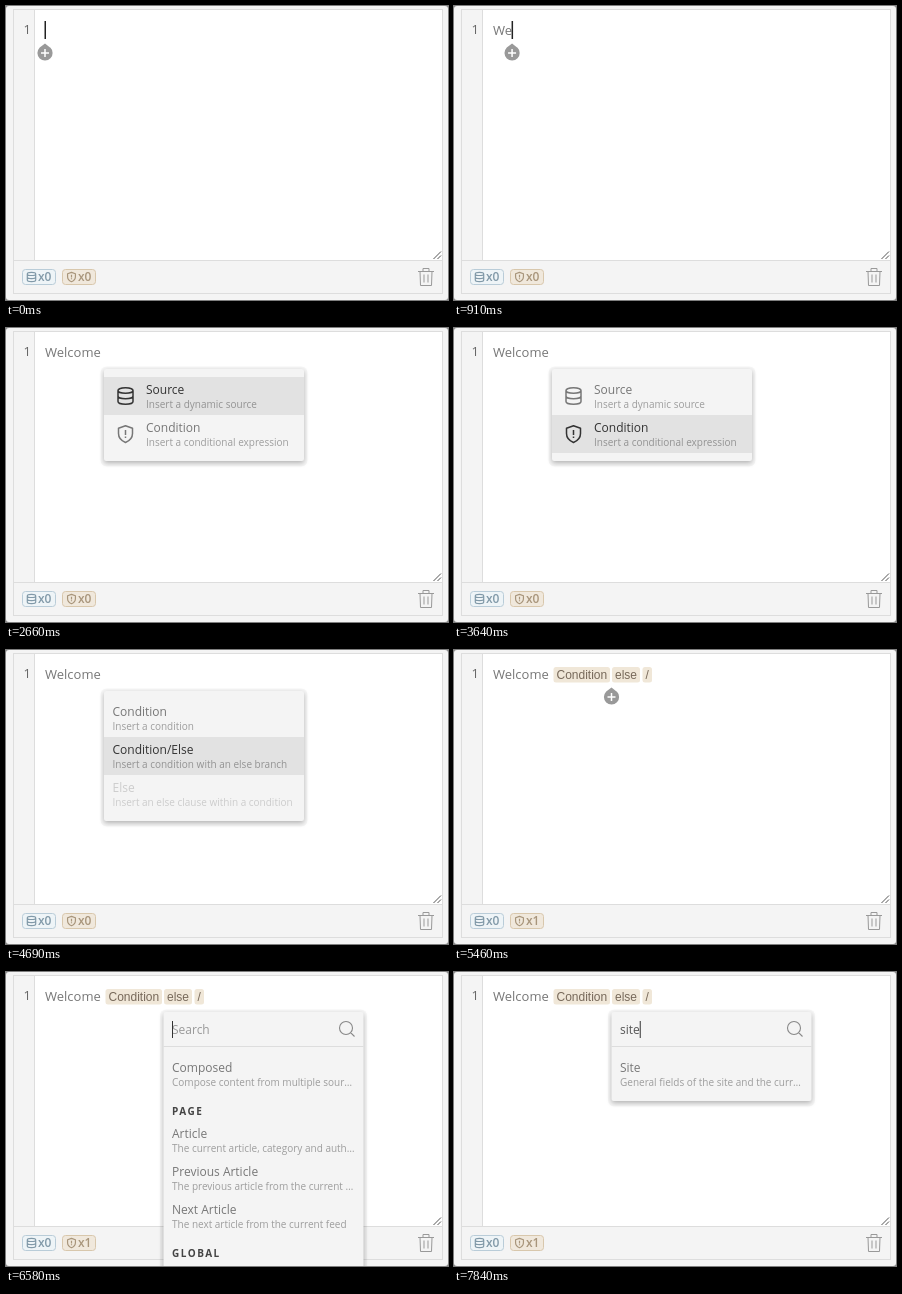
Write an HTML page with a canvas that moves like this. It is 442x294 px and loops after 8 s.

```html
<!DOCTYPE html>
<html lang="en">
<head>
<meta charset="utf-8">
<title>Editor with slash menu</title>
<style>
  html, body { margin: 0; width: 100%; height: 100%; overflow: hidden; background: #888; }
  canvas { display: block; width: 442px; height: 294px; }
</style>
</head>
<body>
<canvas id="stage"></canvas>
<script>
const W = 442, H = 294, LOOP = 8000;
const canvas = document.getElementById('stage');
const ctx = canvas.getContext('2d');
const dpr = window.devicePixelRatio || 1;
canvas.width = W * dpr;
canvas.height = H * dpr;

const SANS = '"Open Sans", sans-serif';
const GREY = '#777', DARK = '#333', PALE = '#ccc', PANEL = '#f4f4f4';
const typeTimes = [560, 910, 1190, 1330, 1470, 1610, 1820, 2030];
const searchTimes = [7350, 7490, 7630, 7840];
const caretOn = [[0, 210], [560, 2590], [3080, 3640], [4130, 4690], [4970, 5460], [6020, 6510]];

const typed = (word, times, t) => word.slice(0, times.filter(at => at <= t).length);
const ramp = (t, from, to) => Math.min(1, Math.max(0, (t - from) / (to - from)));
const grey = v => `rgb(${v},${v},${v})`;

function text(str, x, y, size, color, weight = 400, family = SANS) {
  ctx.font = `${weight} ${size}px ${family}`;
  ctx.fillStyle = color;
  ctx.fillText(str, x, y);
}

function width(str, size) {
  ctx.font = `400 ${size}px ${SANS}`;
  return ctx.measureText(str).width;
}

function rect(x, y, w, h, color) {
  ctx.fillStyle = color;
  ctx.fillRect(x, y, w, h);
}

function roundRect(x, y, w, h, r, fill, stroke) {
  ctx.beginPath();
  ctx.roundRect(x, y, w, h, r);
  ctx.fillStyle = fill;
  ctx.fill();
  if (stroke) {
    ctx.strokeStyle = stroke;
    ctx.lineWidth = 1;
    ctx.stroke();
  }
}

// Strokes an SVG path around (x, y).
function icon(path, x, y, color, line, scale = 1) {
  ctx.save();
  ctx.translate(x, y);
  ctx.scale(scale, scale);
  ctx.strokeStyle = color;
  ctx.lineWidth = line / scale;
  ctx.lineJoin = 'round';
  ctx.stroke(new Path2D(path));
  ctx.restore();
}

const DATABASE = 'M-7.5-5.5a7.5 2.8 0 0 1 15 0a7.5 2.8 0 0 1-15 0V5.5a7.5 2.8 0 0 0 15 0V-5.5M-7.5 0a7.5 2.8 0 0 0 15 0';
const SHIELD = 'M0-8.3L7-5.7V-.5C7 4 4 6.8 0 8.5C-4 6.8-7 4-7-.5V-5.7ZM0-4V1M0 2.4V4';
const TRASH = 'M-8-5.5H8M-3-5.5V-8.5H3V-5.5M-6-5.5L-5.5 8.5H5.5L6-5.5M-2-2.5V5.5M2-2.5V5.5';
const SEARCH = 'M6.5 0A6.5 6.5 0 1 1-6.5 0A6.5 6.5 0 1 1 6.5 0M4.6 4.6L8.5 8.5';
const GRIP = 'M-7.5 7.5L0 0M-3.5 7.5L0 4';

function badge(x, path, label, ink, fill, edge) {
  roundRect(x + .5, 263.5, 33, 15, 3, fill, edge);
  icon(path, x + 9.5, 271, ink, 1.2, .56);
  text(label, x + 16, 275, 12, ink, 600);
}

function chip(label, x, w) {
  roundRect(x, 17, w, 15.5, 2.5, '#f0e7d8');
  text(label, x + 3, 29, 12, '#77695a', 400, '"Liberation Sans", Arial, sans-serif');
}

function plusButton(x) {
  ctx.fillStyle = '#999';
  ctx.beginPath();
  ctx.moveTo(x, 37.5);
  ctx.lineTo(x + 5, 41.5);
  ctx.arc(x, 47, 7.6, -.8, Math.PI + .8);
  ctx.closePath();
  ctx.fill();
  icon('M-4 0H4M0-4V4', x, 47, '#fff', 1.5);
}

function panel(x, y, h) {
  roundRect(x - 3.5, y - 2.5, 207, h + 8, 6, 'rgba(0,0,0,.035)');
  ctx.save();
  ctx.shadowColor = 'rgba(0,0,0,.28)';
  ctx.shadowBlur = 5 * dpr;
  ctx.shadowOffsetY = 2 * dpr;
  roundRect(x, y, 200, h, 2, PANEL);
  ctx.restore();
}

// glow runs from 0 (idle) to 1 (highlighted).
function item(x, y, { title, note, path, off }, glow = 0) {
  if (glow) rect(x, y, 200, 38, grey(244 - 18 * glow));
  const ink = off ? PALE : grey(119 - 68 * glow);
  const left = x + (path ? 42 : 8.5);
  if (path) icon(path, x + 21.5, y + 19, ink, 1.5);
  text(title, left, y + 17, 12, ink);
  text(note, left, y + 31, 10, off ? PALE : grey(157 - 10 * glow));
}

function menu(x, y, items, glows) {
  panel(x, y, items.length * 38 + 16);
  items.forEach((it, i) => item(x, y + 8 + i * 38, it, glows[i]));
}

const source = { title: 'Source', note: 'Insert a dynamic source', path: DATABASE };
const condition = { title: 'Condition', note: 'Insert a conditional expression', path: SHIELD };
const branches = [
  { title: 'Condition', note: 'Insert a condition' },
  { title: 'Condition/Else', note: 'Insert a condition with an else branch' },
  { title: 'Else', note: 'Insert an else clause within a condition', off: true }
];
const feeds = [
  { title: 'Composed', note: 'Compose content from multiple sour…' },
  'PAGE',
  { title: 'Article', note: 'The current article, category and auth…' },
  { title: 'Previous Article', note: 'The previous article from the current …' },
  { title: 'Next Article', note: 'The next article from the current feed' },
  'GLOBAL'
];
const site = [{ title: 'Site', note: 'General fields of the site and the curr…' }];

function searchPanel(t) {
  const x = 157.5, query = typed('site', searchTimes, t);
  const list = query.length > 1 ? site : feeds;
  panel(x, 40, list === site ? 89 : 270);
  rect(x, 74, 200, 1, '#ddd');
  text(query || 'Search', 166, 62, 12, query ? '#555' : '#999');
  icon(SEARCH, 340, 56, '#888', 1.1);
  if (t >= 6580 && t < 7140 || query) rect(166 + width(query, 12), 49, 1, 17, DARK);
  let y = 83;
  for (const row of list) {
    if (row.title) {
      item(x, y, row);
      y += 38;
    } else {
      ctx.letterSpacing = '1.5px';
      text(row, 166, y + 22, 10, '#444', 700);
      ctx.letterSpacing = '0px';
      y += 28;
    }
  }
}

function frame() {
  roundRect(0, 0, W, H, 3, PANEL);
  rect(7, 3, 430, 285, '#ddd');
  rect(8, 4, 428, 283, PANEL);
  rect(28, 4, 1, 250, '#ddd');
  rect(29, 4, 407, 250, '#fff');
  rect(8, 254, 428, 1, '#ddd');
  icon(GRIP, 435, 245.5, '#555', 1);
  icon(TRASH, 420, 271, '#999', 1);
  text('1', 17.5, 28, 13, '#666');
}

function draw(t) {
  ctx.setTransform(dpr, 0, 0, dpr, 0, 0);
  ctx.clearRect(0, 0, W, H);
  frame();

  const inserted = t >= 4970;
  badge(16, DATABASE, 'x0', '#8199a8', '#eef4f7', '#b9ccd8');
  badge(56, SHIELD, inserted ? 'x1' : 'x0', '#a8957b', '#f0e8dc', '#d8c7ac');

  const word = typed('Welcome ', typeTimes, t);
  text(word, 39, 29, 13, GREY);
  if (inserted) {
    chip('Condition', 99.5, 56.5);
    chip('else', 158, 28);
    chip('/', 188.5, 9.5);
  }

  const caretX = inserted ? 157.5 : 39 + width(word, 13);
  if (caretOn.some(([a, b]) => t >= a && t < b)) rect(caretX - .5, 15, 1.5, 18, '#222');

  if (t < 2660 || inserted && t < 5880) {
    plusButton(caretX);
  } else if (t < 3780) {
    const p = ramp(t, 3080, 3360);
    menu(98, 41, [source, condition], [1 - p, p]);
  } else if (t < 4970) {
    const p = ramp(t, 4200, 4480);
    menu(98, 41, branches, [1 - p, p, 0]);
  } else if (t < 6510) {
    menu(157.5, 40, [source, { ...condition, off: true }], [1, 0]);
  } else {
    searchPanel(t);
  }
}

const start = performance.now();
function tick() {
  draw((performance.now() - start) % LOOP);
  requestAnimationFrame(tick);
}
tick();
</script>
</body>
</html>
```
